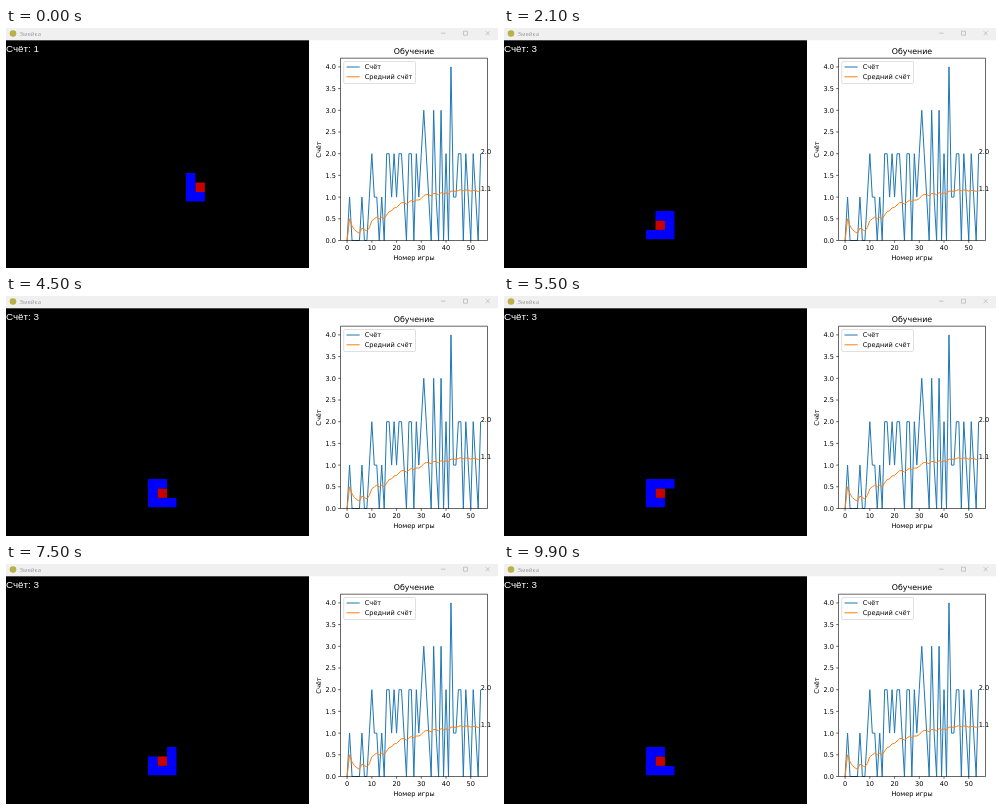
An HTML page that plays this animation: 492x240 px, repeating every 10000 ms.

```html
<!DOCTYPE html>
<html lang="ru">
<head>
<meta charset="utf-8">
<style>
html, body { margin: 0; width: 100%; height: 100%; overflow: hidden; background: #fff; }
svg { display: block; }
text { font: 6.57px "DejaVu Sans", sans-serif; }
.mid { text-anchor: middle; }
.end { text-anchor: end; }
.thin { fill: none; stroke: #000; stroke-width: .6; }
.line { fill: none; stroke-width: 1; stroke-linejoin: round; }
</style>
</head>
<body>
<svg width="492" height="240" viewBox="0 0 492 240">
  <rect width="492" height="12.3" fill="#f0f0f0"/>
  <circle cx="7" cy="5.5" r="3.3" fill="#b9b04a"/>
  <text x="13.5" y="7.8" fill="#999" style="font: 6px 'Open Sans', sans-serif">Змейка</text>
  <path d="M435 5.2h4.5M457.5 3.2h4v4h-4zM479.7 3.2l4 4m0-4l-4 4" fill="none" stroke="#aaa" stroke-width=".6"/>

  <rect y="12.3" width="303" height="227.7"/>
  <path id="food" fill="#c80000"/>
  <path id="snake" fill="#00f"/>
  <text id="score" x="0" y="24" fill="#fff" style="font: 9.8px 'Liberation Sans', Arial, sans-serif"></text>

  <g id="chart">
    <text class="mid" x="408" y="26" style="font-size: 7.9px">Обучение</text>
    <text class="mid" x="408" y="231.5">Номер игры</text>
    <text class="mid" transform="translate(315 121.5) rotate(-90)">Счёт</text>
  </g>
  <g id="legend">
    <rect x="337.7" y="33.5" width="71.8" height="22" rx="1.3" fill="#fff" fill-opacity=".8" stroke="#ccc" stroke-width=".6"/>
    <path class="line" stroke="#1f77b4" d="M340.5 39h13.2"/>
    <path class="line" stroke="#ff7f0e" d="M340.5 48.8h13.2"/>
    <text x="358.7" y="41.4">Счёт</text>
    <text x="358.7" y="51.2">Средний счёт</text>
  </g>
</svg>
<script>
const $ = id => document.getElementById(id);

// Chart
const scores = [..."0100001001" + "2110102212" + "1221022021" + "2321031030" + "2041122021" + "02102"].map(Number);
const px = n => 341.1 + n * 2.473, py = v => 212.5 - v * 43.4;
const polyline = values => "M" + values.map((v, n) => `${px(n).toFixed(2)} ${py(v).toFixed(2)}`).join("L");
const label = (x, y, s, cls = "") => `<text class="${cls}" x="${x}" y="${y}">${s}</text>`;
let sum = 0;
const means = scores.map((v, n) => (sum += v) / (n + 1));
const last = scores.length - 1;

let ticks = "", labels = "";
for (let n = 0; n <= 50; n += 10) {
  ticks += `M${px(n)} 212.5v2.3`;
  labels += label(px(n), 222.3, n, "mid");
}
for (let v = 0; v <= 4; v += .5) {
  ticks += `M334.5 ${py(v)}h-2.3`;
  labels += label(330, py(v) + 2.4, v.toFixed(1), "end");
}
$("chart").insertAdjacentHTML("beforeend",
  `<path class="line" stroke="#1f77b4" d="${polyline(scores)}"/>
   <path class="line" stroke="#ff7f0e" d="${polyline(means)}"/>
   <path class="thin" d="M334.5 30.2H481.5V212.5H334.5z${ticks}"/>` + labels +
  label(px(last), py(scores[last]), scores[last].toFixed(1)) +
  label(px(last), py(means[last]), means[last].toFixed(1)));

// Snake: the head's route on a 32-column grid, ending in laps around the last food
const CELL = 303 / 32, lap = "RRDDLLUU";
const steps = { R: [1, 0], D: [0, 1], L: [-1, 0], U: [0, -1] };
const route = [[20, 16]];
for (const d of "LUU" + lap.repeat(2) + "RDDDDDDD" + "LLLLLUUU" + lap.repeat(20)) {
  const [x, y] = route.at(-1);
  route.push([x + steps[d][0], y + steps[d][1]]);
}
const foods = [[20, 15], [20, 21], [16, 19]];
// Time in ms and moves made by then
const pace = [[0, 0], [2100, 38], [3500, 63], [5500, 98], [7500, 135], [8500, 152], [9900, 177]];

function movesAt(t) {
  const i = pace.findIndex(([end]) => t <= end) || 1;
  const [t0, m0] = pace[i - 1], [t1, m1] = pace[i];
  return Math.floor(m0 + (m1 - m0) * (t - t0) / (t1 - t0) + .5);
}

const block = ([x, y]) => `M${x * CELL} ${12.5 + y * CELL}h${CELL}v${CELL}h${-CELL}z`;

function draw(now) {
  const t = Math.floor(now % 10000 / 100) * 100;
  const moves = movesAt(t);
  const eaten = (moves >= 18) + (moves >= 24);
  const head = moves + 3;
  $("snake").setAttribute("d", route.slice(head - 3 - eaten, head + 1).map(block).join(""));
  $("food").setAttribute("d", block(foods[eaten]));
  $("score").textContent = "Счёт: " + (1 + eaten);
}

const start = performance.now();
function frame() {
  draw(performance.now() - start);
  requestAnimationFrame(frame);
}
frame();
</script>
</body>
</html>
```
